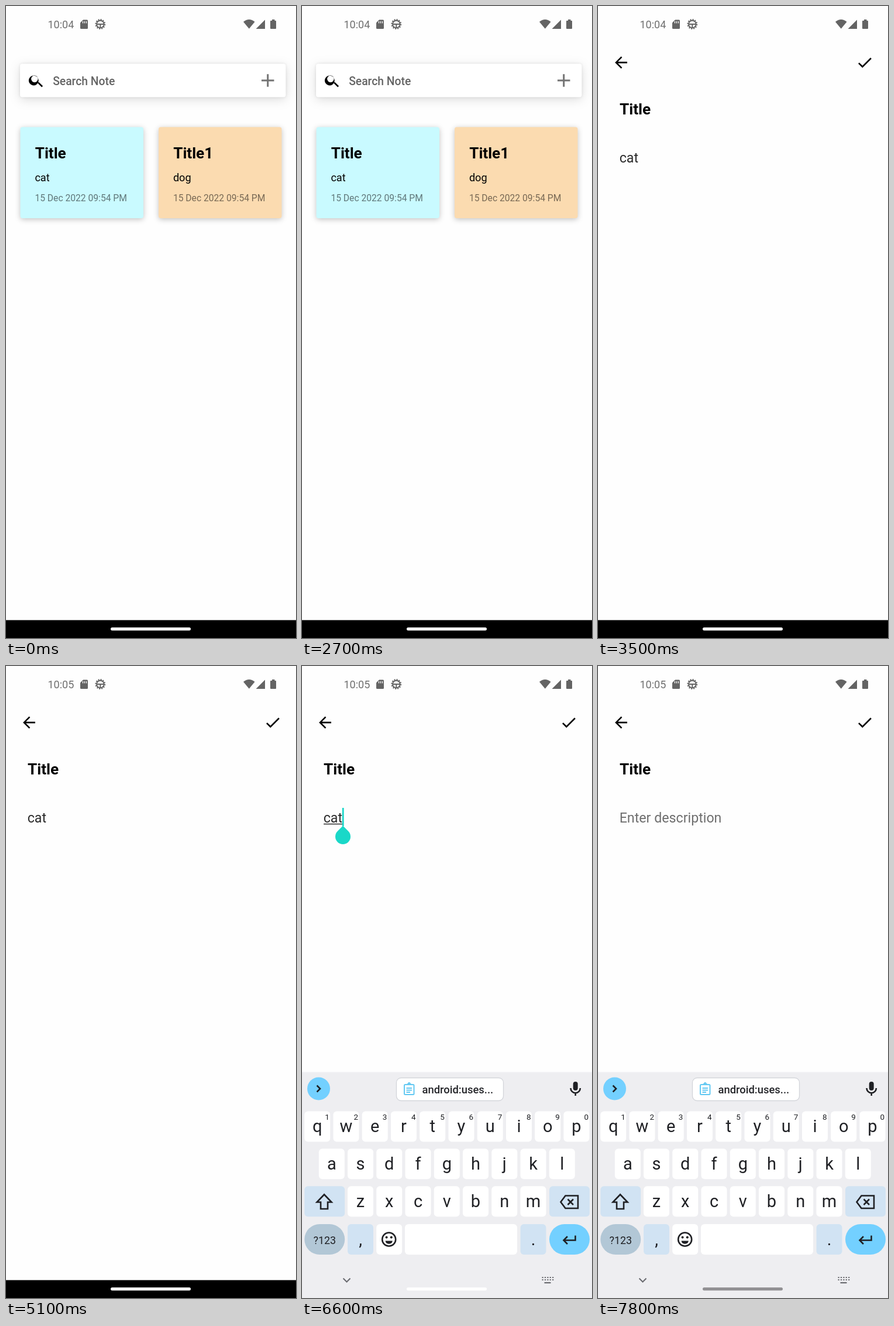
Animation, 496 px wide and 1078 px high, one loop 8 s. Source, as an HTML page:

```html
<!DOCTYPE html>
<html lang="en">
<head>
<meta charset="utf-8">
<title>Notes</title>
<style>
  html, body { margin: 0; width: 100%; height: 100%; overflow: hidden; background: #fefefe; }
  svg { display: block; width: 100%; height: 100%; font-family: Roboto, sans-serif; }
  .bold { font-weight: 700; font-size: 26.2px; }
  .medium { font-weight: 500; }
  .body { font-size: 18.1px; }
  .date { font-size: 15.65px; fill: #000; opacity: .52; }
  .field { font-size: 23.2px; }
  .card { filter: drop-shadow(0 2px 5px rgba(0, 0, 0, .24)); }
  .bar { filter: drop-shadow(0 4px 9px rgba(0, 0, 0, .13)) drop-shadow(0 0 2px rgba(0, 0, 0, .1)); }
  .line { fill: none; stroke: #1f2024; stroke-width: 2.6; }
  #keys text { text-anchor: middle; fill: #1f2024; }
</style>
</head>
<body>
<svg viewBox="0 0 496 1078" preserveAspectRatio="none">
  <rect width="496" height="1078" fill="#fefefe"/>

  <!-- status bar -->
  <g fill="#646464">
    <text id="clock" x="71.5" y="38" font-size="18" fill="#707070"></text>
    <path d="M132 23.5h6.5q1.5 0 1.5 1.5v12.500q0 1.500-1.500 1.500h-10q-1.500 0-1.500-1.500v-9z"/>
    <path d="M131.500 26v3.500m3-3.500v3.500m3-3.500v3.500" stroke="#fefefe" stroke-width="1.300"/>
    <g fill="none" stroke="#646464">
      <circle cx="161.300" cy="31" r="6.300" stroke-width="1.900"/>
      <circle cx="161.300" cy="31" r="7.900" stroke-width="2" stroke-dasharray="2.070 2.070"/>
      <path d="M155.500 31h11.600m-5.800 0v6" stroke-width="2"/>
    </g>
    <path d="M406 27q9.750-8 19.500 0l-9.750 11.700zM443 23.500v15.500h-15.500zM452 26q0-1 1-1h2v-2h4.500v2h1.500q1 0 1 1v12q0 1-1 1h-8q-1 0-1-1z"/>
  </g>

  <!-- note list -->
  <g id="list">
    <rect class="bar" x="24" y="98.500" width="454.500" height="57" rx="4" fill="#fff"/>
    <path transform="translate(36.600 112.100) scale(1.290)" d="M15.500 14h-.79l-.28-.27A6.500 6.500 0 1 0 14 14.710v.79l5 4.990L20.490 19zM9.500 14a4.500 4.500 0 1 1 0-9 4.500 4.500 0 0 1 0 9z"/>
    <text class="medium" x="80.200" y="134.500" font-size="19.300" fill="#646464">Search Note</text>
    <path d="M437 127h21.500m-10.750-10.750v21.500" stroke="#737373" stroke-width="3"/>
    <rect class="card" x="24.500" y="206.500" width="210.500" height="155.500" rx="4" fill="#c9faff"/>
    <clipPath id="cardClip"><rect x="24.500" y="206.500" width="210.500" height="155.500" rx="4"/></clipPath>
    <circle id="ripple" cx="130" cy="284" clip-path="url(#cardClip)" fill="#b0d4db"/>
    <text class="bold" x="49.700" y="259.500">Title</text>
    <text class="body" x="49.400" y="298.500">cat</text>
    <text class="date" x="49.400" y="333">15 Dec 2022 09:54 PM</text>
    <g transform="translate(236.500)">
      <rect class="card" x="24.500" y="206.500" width="210.500" height="155.500" rx="4" fill="#fbdbb0"/>
      <text class="bold" x="49.700" y="259.500">Title1</text>
      <text class="body" x="49.400" y="298.500">dog</text>
      <text class="date" x="49.400" y="333">15 Dec 2022 09:54 PM</text>
    </g>
  </g>

  <!-- note editor -->
  <g id="editor">
    <path transform="translate(23.900 80.800) scale(1.300)" d="M20 11H7.830l5.590-5.590L12 4l-8 8 8 8 1.410-1.410L7.830 13H20z"/>
    <path transform="translate(440.600 80.800) scale(1.300)" d="M9 16.170L4.830 12l-1.420 1.410L9 19 21 7l-1.410-1.410z"/>
    <text class="bold" x="37" y="185">Title</text>
    <text id="note" class="field" x="36.700" y="267" fill="#2b2b2b"></text>
    <text id="hint" class="field" x="36.700" y="267" fill="#6e6e6e">Enter description</text>
    <rect id="underline" x="37" y="268.800" height="1.500" fill="#2b2b2b"/>
    <rect id="caret" y="242" width="2.800" height="31" fill="#1ad6c8"/>
    <path id="handle" d="M70 272.600l9.190 9.190a13 13 0 1 1-18.380 0z" fill="#1ad8c8"/>
  </g>

  <rect y="1047.500" width="496" height="30.500"/>

  <!-- keyboard -->
  <g id="keyboard">
    <rect y="692" width="496" height="2" fill="#f6f6f8"/>
    <rect y="693.500" width="496" height="385" fill="#eeeef1"/>
    <circle cx="28.500" cy="721" r="19.500" fill="#73d0ff"/>
    <path class="line" d="M25.500 715.500l5.500 5.500-5.500 5.500"/>
    <rect x="161.500" y="702.500" width="183" height="39" rx="8" fill="#fff" stroke="#d3d5da" stroke-width="1.300"/>
    <g fill="none" stroke="#62c8f2" stroke-width="2">
      <rect x="175" y="714" width="16.500" height="17" rx="1.500"/>
      <path d="M178.500 720h9.500m-9.500 3.500h9.500m-9.500 3.500h6.500M179.500 713.500h7.500" />
      <circle cx="183.200" cy="712.500" r="1.500"/>
    </g>
    <text class="medium" x="205.500" y="729" font-size="18.400" fill="#25262a">android:uses...</text>
    <rect x="463.700" y="709" width="8" height="15" rx="4" fill="#1f2024"/>
    <path class="line" d="M459.500 720a8.200 8.200 0 0 0 16.400 0m-8.200 8v5"/>
    <g id="keys"></g>
    <path class="line" d="M38 901.500l12.500 13h-6.500v11.500h-12v-11.500h-6.500z"/>
    <path class="line" d="M450.500 903.500h21.500v21.500h-21.500l-8-10.750zM454.500 909.500l9.500 9.500m0-9.500l-9.500 9.500"/>
    <circle class="line" cx="148.700" cy="978" r="11.500"/>
    <path d="M142.500 980.500h12.400a6.300 6.300 0 0 1-12.400 0z" fill="#1f2024"/>
    <circle cx="144.600" cy="974.500" r="1.900"/><circle cx="152.800" cy="974.500" r="1.900"/>
    <path class="line" d="M467.500 971.500v8h-20m6.500-6.500l-6.500 6.500 6.500 6.500"/>
    <path d="M70.500 1044.500l6 6 6-6" fill="none" stroke="#6a6b70" stroke-width="2"/>
    <path d="M410.500 1043h20m-20 4h20" stroke="#6a6b70" stroke-width="2.200" stroke-dasharray="2.200 2.200"/>
    <path d="M414.500 1052h11" stroke="#6a6b70" stroke-width="2.200"/>
  </g>

  <rect id="pill" x="179" y="1060" width="137" height="5.200" rx="2.600"/>
</svg>
<script>
const LOOP = 8000, PITCH = 49.25;
const $ = id => document.getElementById(id);

let keys = "";
function key(x, y, w, label = "", { fill = "#fff", r = 6, size = 29, base = 35.5 } = {}) {
  keys += `<rect x="${x}" y="${y}" width="${w}" height="52" rx="${r}" fill="${fill}"/>` +
    `<text x="${x + w / 2}" y="${y + base}" font-size="${size}">${label}</text>`;
}
[["qwertyuiop", 4.2, 759.5], ["asdfghjkl", 28.8, 823.3], ["zxcvbnm", 78, 887.3]].forEach(([letters, x, y], row) => {
  [...letters].forEach((letter, i) => {
    key(x + i * PITCH, y, 44, letter);
    if (!row) keys += `<text x="${43 + i * PITCH}" y="774" font-size="13.5">${(i + 1) % 10}</text>`;
  });
});
const pale = { fill: "#d1e3f3" };
key(4.2, 887.3, 69, "", pale);
key(423, 887.3, 69, "", pale);
key(4.2, 952, 69, "?123", { fill: "#b2c7d6", r: 26, size: 17.8, base: 34 });
key(78, 952, 44, ",", pale);
key(127.2, 952, 44);
key(176, 952, 192);
key(373.5, 952, 44, ".", pale);
key(423, 952, 69, "", { fill: "#73d0ff", r: 26 });
$("keys").innerHTML = keys;

const progress = (t, from, to) => Math.min(1, Math.max(0, (t - from) / (to - from)));
const easeOut = p => 1 - (1 - p) ** 3;
const show = (id, on) => $(id).setAttribute("visibility", on ? "visible" : "hidden");
const noteWidths = { "": 0, c: 12.1, ca: 24.7, cat: 32.3 };

function draw(t) {
  const editing = t >= 3500;
  $("list").style.display = editing ? "none" : "";
  $("editor").style.display = editing ? "" : "none";
  $("clock").textContent = t < 4000 ? "10:04" : "10:05";

  const press = progress(t, 2700, 3100);
  $("ripple").setAttribute("r", 40 + 100 * easeOut(press));
  $("ripple").setAttribute("opacity", press);

  const note = t < 6800 ? "cat" : t < 7000 ? "ca" : t < 7200 ? "c" : "";
  const width = noteWidths[note];
  $("note").textContent = note;
  show("hint", !note);
  show("underline", t >= 5700 && note);
  $("underline").setAttribute("width", width);
  $("caret").setAttribute("x", 36.5 + width);
  show("caret", t >= 5300 && t < 6400 || t >= 6500 && t < 7700);
  show("handle", t >= 5700 && t < 6800);

  const rise = easeOut(progress(t, 6400, 6600));
  show("keyboard", rise > 0);
  $("keyboard").setAttribute("transform", `translate(0 ${386 * (1 - rise)})`);

  const dim = progress(t, 6900, 7400);
  const mix = to => Math.round(255 + (to - 255) * dim);
  $("pill").setAttribute("fill", `rgb(${mix(146)},${mix(145)},${mix(148)})`);
}

const start = performance.now();
function tick() {
  draw((performance.now() - start) % LOOP);
  requestAnimationFrame(tick);
}
tick();
</script>
</body>
</html>
```
